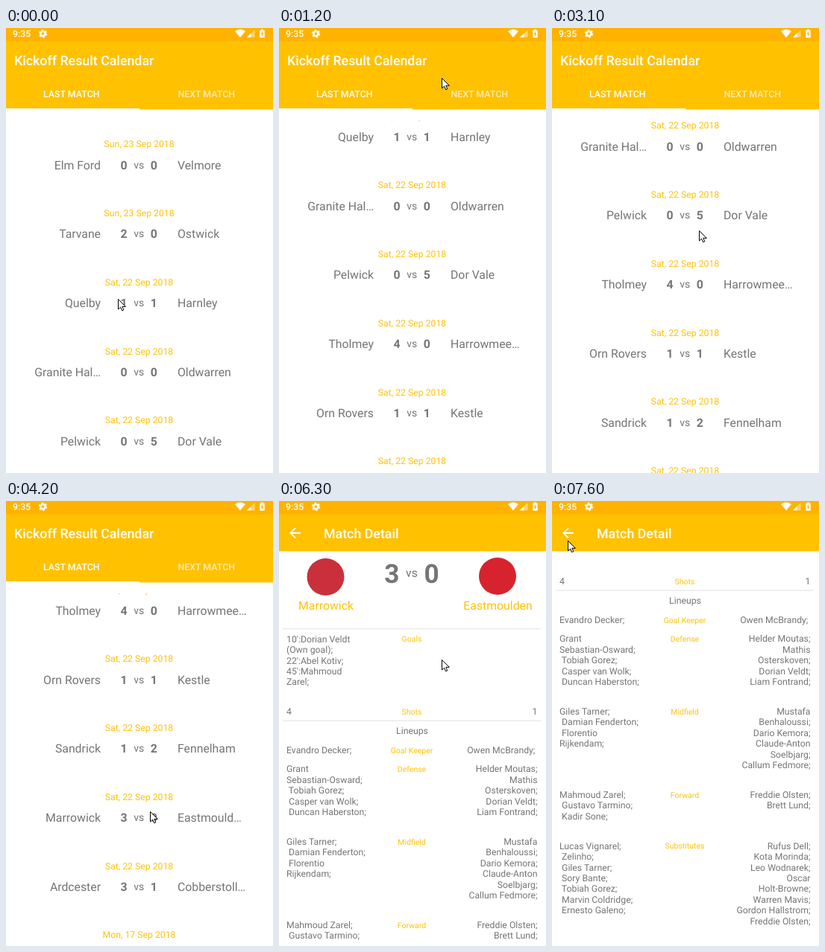
An HTML page that plays this animation: 358x598 px, repeating every 8 s.

```html
<!DOCTYPE html>
<html lang="en">
<head>
<meta charset="utf-8">
<title>Match results</title>
<style>
  html, body { margin: 0; width: 100%; height: 100%; overflow: hidden; background: #fff; }
  svg { display: block; width: 358px; height: 598px; font-family: Roboto, sans-serif; }
  text { white-space: pre; fill: #757575; font-size: 12.25px; text-rendering: geometricPrecision; }
  .title { fill: #fff; font-size: 17.8px; font-weight: 500; }
  .tab { fill: #fff; font-size: 12.4px; font-weight: 500; }
  .dim { opacity: .7; }
  .team { font-size: 15.8px; }
  .score { font-size: 15.8px; font-weight: 700; }
  .vs { font-size: 14px; }
  .date { fill: #ffc107; }
  .name { fill: #ffc107; font-size: 15.8px; }
  .big { font-size: 35.2px; font-weight: 700; }
  .label { fill: #ffc107; font-size: 10.5px; }
  .bar { fill: #ffc100; }
  .top { fill: #ffb300; }
</style>
</head>
<body>
<svg id="stage" viewBox="0 0 358 598">
  <defs>
    <clipPath id="listClip"><rect y="124" width="358" height="474"/></clipPath>
    <clipPath id="bodyClip"><rect x="5" y="75" width="346" height="516"/></clipPath>
    <clipPath id="revealClip"><rect id="reveal" width="358" height="640"/></clipPath>
  </defs>
  <g id="listScreen">
    <rect width="358" height="598" fill="#fff"/>
    <g clip-path="url(#listClip)"><g id="rows"></g></g>
    <rect class="bar" width="358" height="109.5"/>
    <rect class="top" width="358" height="18"/>
    <rect y="108" width="179" height="2" fill="#fff"/>
    <text class="title" x="11" y="49.5">Kickoff Result Calendar</text>
    <text class="tab" x="87.8" y="93.3" text-anchor="middle">LAST MATCH</text>
    <text class="tab dim" x="268.8" y="93.3" text-anchor="middle">NEXT MATCH</text>
  </g>
  <rect id="shade" width="358" height="598"/>
  <g id="detailWrap" clip-path="url(#revealClip)">
    <g id="detail">
      <rect width="358" height="640" fill="#fff"/>
      <rect class="bar" width="358" height="67.5"/>
      <rect class="top" width="358" height="18"/>
      <path d="M29 43H16M22 36.4L15.4 43L22 49.6" fill="none" stroke="#fff" stroke-width="1.8"/>
      <text class="title" x="60" y="49.5">Match Detail</text>
      <g id="loading">
        <path d="M5 209.5H351M5 261.5H351" stroke="#ebebeb" stroke-width="1.5"/>
        <circle id="spinner" cx="179" cy="95" r="13" fill="none" stroke="#ffc107" stroke-width="3.4" pathLength="360"/>
      </g>
      <g id="loaded" clip-path="url(#bodyClip)">
        <g id="body"></g>
        <path id="glow" d="M5 591Q178 562 351 591Z" fill="#ffc107"/>
      </g>
    </g>
  </g>
  <g fill="#fff">
    <text x="9" y="12.3" style="fill:#fff;font-weight:500">9:35</text>
    <circle cx="49.5" cy="7.6" r="3.1" fill="none" stroke="#fff" stroke-width="2.5"/>
    <circle cx="49.5" cy="7.6" r="4.9" fill="none" stroke="#fff" stroke-width="1.6" stroke-dasharray="2.57 2.57"/>
    <path d="M307 4.3Q314 -.8 321 4.3L314 12.8Z"/>
    <path d="M333.5 2.5V12.5H323Z" opacity=".45"/>
    <path d="M328.5 7.3V12.5H323Z"/>
    <path d="M340.3 3H342V1.8H345V3H346.7V13H340.3Z"/>
    <path class="top" d="M344 4.4L341.6 8.5H343.1V11.6L345.5 7.4H344Z"/>
  </g>
  <path id="cursor" d="M.5 .5V14L3.5 11.2L5.7 15.8L7.8 14.9L5.8 10.4H10.3Z" fill="#fff" stroke="#000" stroke-linejoin="round"/>
</svg>
<script>
const $ = id => document.getElementById(id);
const NS = 'http://www.w3.org/2000/svg';

function add(parent, tag, attrs, content = '') {
  const el = document.createElementNS(NS, tag);
  for (const k in attrs) el.setAttribute(k, attrs[k]);
  el.textContent = content;
  parent.appendChild(el);
}
const write = (parent, s, x, y, cls, anchor = 'middle') =>
  add(parent, 'text', { x, y, class: cls, 'text-anchor': anchor }, s);

// Match list
const PITCH = 92.75;
const matches = `Elm Ford 0-0 Velmore|Tarvane 2-0 Ostwick|Quelby 1-1 Harnley|Granite Hal… 0-0 Oldwarren
Pelwick 0-5 Dor Vale|Tholmey 4-0 Harrowmee…|Orn Rovers 1-1 Kestle|Sandrick 1-2 Fennelham
Marrowick 3-0 Eastmould…|Ardcester 3-1 Cobberstoll…`.split(/[|\n]/);
const dateOf = i => i < 2 ? 'Sun, 23 Sep 2018' : i < 10 ? 'Sat, 22 Sep 2018' : 'Mon, 17 Sep 2018';
const rows = $('rows');
matches.forEach((match, i) => {
  const [, home, a, b, away] = match.match(/(.+) (\d)-(\d) (.+)/);
  const y = 189.6 + i * PITCH;
  write(rows, home, 127, y, 'team', 'end');
  write(rows, a, 158, y, 'score');
  write(rows, 'vs', 178.3, y - 1, 'vs');
  write(rows, b, 198.3, y, 'score');
  write(rows, away, 230, y, 'team', 'start');
});
for (let i = 0; i <= matches.length; i++) write(rows, dateOf(i), 178.5, 160.3 + i * PITCH, 'date');

// Match detail
const body = $('body');
const sections = [
  [185.5, 'Goals', "10':Dorian Veldt|(Own goal);|22':Abel Kotiv;|45':Mahmoud|Zarel;", ''],
  [283, 'Shots', '4', '1'],
  [335, 'Goal Keeper', 'Evandro Decker;', 'Owen McBrandy; '],
  [360, 'Defense', 'Grant|Sebastian-Osward;| Tobiah Gorez;| Casper van Wolk;| Duncan Haberston;',
    'Helder Moutas;|Mathis|Osterskoven;|Dorian Veldt;|Liam Fontrand;'],
  [457.7, 'Midfield', 'Giles Tarner;| Damian Fenderton;| Florentio|Rijkendam;',
    'Mustafa|Benhaloussi;|Dario Kemora;|Claude-Anton|Soelbjarg;|Callum Fedmore;'],
  [569.6, 'Forward', 'Mahmoud Zarel;| Gustavo Tarmino;| Kadir Sone;', 'Freddie Olsten;|Brett Lund;'],
  [638.4, 'Substitutes', 'Lucas Vignarel;| Zelinho;| Giles Tarner;| Sory Bante;| Tobiah Gorez;| Marvin Coldridge;| Ernesto Galeno;',
    'Rufus Dell;|Kota Morinda;|Leo Wodnarek;|Oscar|Holt-Browne;|Warren Mavis;|Gordon Hallstrom;|Freddie Olsten;']
];
const column = (s, x, y, anchor) =>
  s.split('|').forEach((line, i) => write(body, line, x, y + 4.3 + i * 14.4, '', anchor));

add(body, 'circle', { cx: 62.5, cy: 102, r: 25, fill: '#c9303c' });
add(body, 'circle', { cx: 293, cy: 101, r: 25, fill: '#d7232e' });
write(body, 3, 151.3, 109.7, 'big');
write(body, 'vs', 178, 102, 'team');
write(body, 0, 204.5, 109.7, 'big');
write(body, 'Marrowick', 63, 146.4, 'name');
write(body, 'Eastmoulden', 293.5, 146.4, 'name');
add(body, 'path', { d: 'M5 171.8H351M5 295.2H351', stroke: '#ebebeb', 'stroke-width': 1.5 });
write(body, 'Lineups', 178.5, 313.4, '');
for (const [y, label, left, right] of sections) {
  column(left, 10, y, 'start');
  column(right, 346.5, y, 'end');
  write(body, label, 178, y + 3.9, 'label');
}

// Motion
const part = (t, start, end) => Math.min(1, Math.max(0, (t - start) / (end - start)));
const smooth = u => u * u * (3 - 2 * u);
const fling = u => (1 - (1 - u) ** 3) ** 2;   // quick drag, long glide
const hump = u => Math.sin(Math.PI * u);

// Pointer moves: start time, end time, x, y reached
const moves = [
  [100, 400, 186, 414], [600, 1200, 218, 67], [1300, 2400, 208, 398], [2700, 3100, 197, 272],
  [3100, 3400, 184, 239], [3700, 4200, 193, 417], [5300, 5900, 208, 514], [6000, 6300, 218, 213],
  [6300, 7200, 83, 113], [7300, 7600, 21, 53]
];
function pointerAt(t) {
  let x = 150, y = 364;
  for (const [start, end, toX, toY] of moves) {
    const u = smooth(part(t, start, end));
    x += (toX - x) * u;
    y += (toY - y) * u;
  }
  return [Math.round(x), Math.round(y)];
}

const shift = (id, x, y) => $(id).setAttribute('transform', `translate(${x} ${y})`);
const show = (id, on) => $(id).setAttribute('display', on ? 'inline' : 'none');

function draw(t) {
  const opened = t >= 4700, covered = t >= 5200, ready = t >= 6100;
  show('listScreen', !covered);
  show('shade', opened && !covered);
  show('detailWrap', opened);
  show('loading', !ready);
  show('loaded', ready);

  shift('rows', 0, -291.5 * fling(part(t, 700, 1700)) - 209 * fling(part(t, 3040, 3740)));
  shift('body', 0, -175 * fling(part(t, 6300, 6900)));
  shift('cursor', ...pointerAt(t));

  // The new screen rises and is uncovered from below while the old one slides up and darkens.
  const rest = 1 - part(t, 4650, 5200), rise = rest ** 2;
  $('reveal').setAttribute('y', 598 * rest ** 4);
  shift('detail', 0, 24 * rise);
  shift('listScreen', 0, -12 * (1 - rise));
  $('shade').setAttribute('opacity', .1 * (1 - rise));

  const turn = part(t, 5300, 5900);
  $('spinner').setAttribute('transform', `rotate(${-78 + 133 * turn} 179 95)`);
  $('spinner').setAttribute('stroke-dasharray', `${40 + 40 * hump(turn)} 360`);
  $('glow').setAttribute('opacity', .2 * hump(part(t, 6600, 7200)));
}

// The screen updates ten times a second.
const LOOP = 8000, STEP = 100;
const begin = performance.now();
function tick() {
  const t = (performance.now() - begin) % LOOP;
  draw(Math.floor(t / STEP) * STEP);
  requestAnimationFrame(tick);
}
tick();
</script>
</body>
</html>
```
